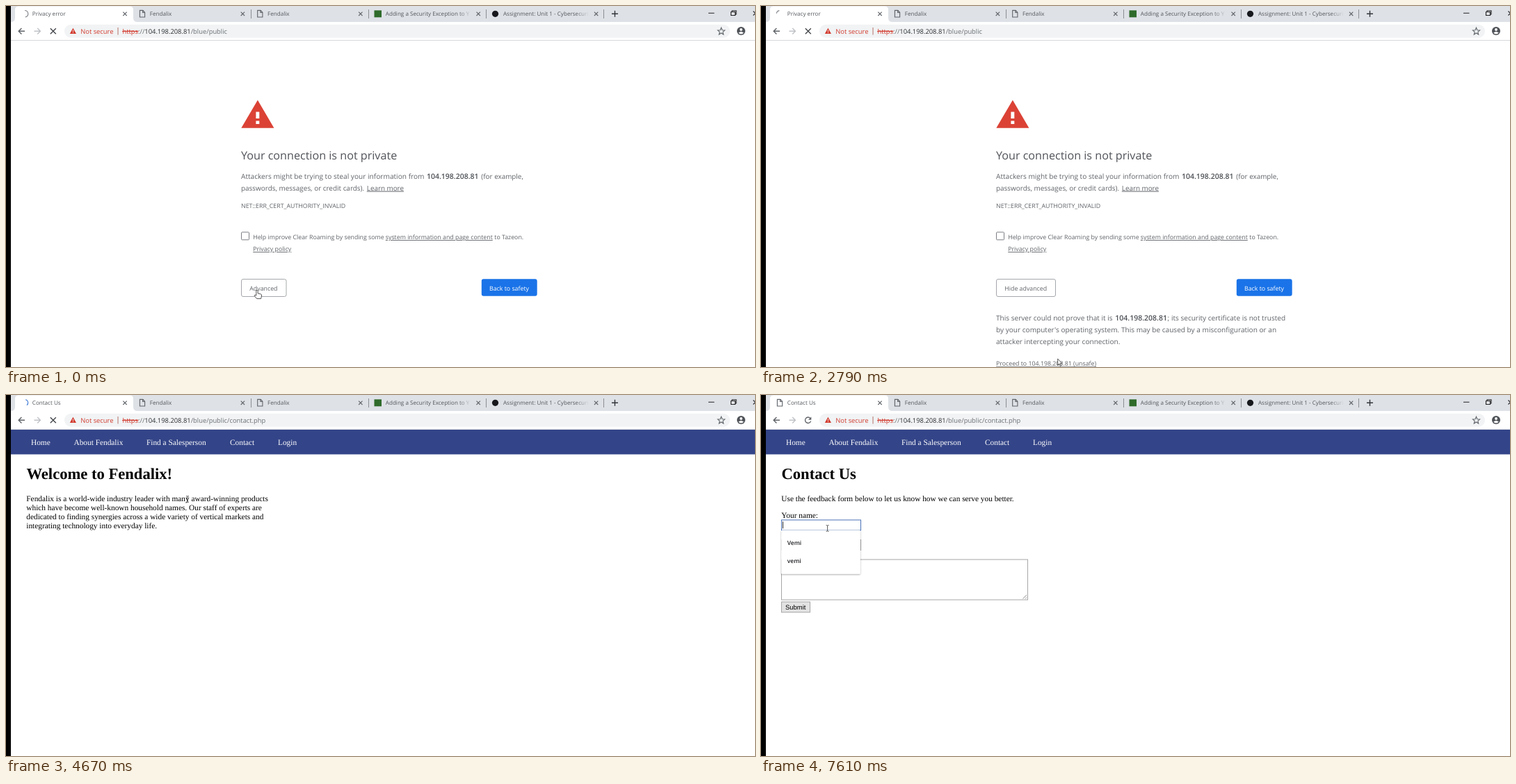
Recreate the animation shown at these times as an HTML page. Size 1077x520 px, loop 8000 ms.

```html
<!DOCTYPE html>
<html lang="en">
<head>
<meta charset="utf-8">
<title>Browser session</title>
<style>
html, body { margin: 0; width: 100%; height: 100%; overflow: hidden; background: #fff; }
svg { display: block; width: 1077px; height: 520px; }
text { font-family: "Open Sans", "Noto Sans", sans-serif; text-rendering: geometricPrecision; white-space: pre; }
.tab { font-size: 8.1px; fill: #54585d; }
.url { font-size: 9.37px; fill: #6b6f74; }
.body { font-size: 10.08px; fill: #5f6368; }
.small { font-size: 8.8px; fill: #5f6368; }
.bold { font-size: 10.5px; font-weight: 600; fill: #4c5055; }
.link { text-decoration: underline; text-underline-offset: 1.1px; }
.serif text { font-family: "Liberation Serif", "Times New Roman", serif; font-size: 11.34px; }
.serif .h1 { font-size: 22.6px; font-weight: bold; }
.nav text { fill: #fff; }
.line { fill: none; stroke: #5f6368; stroke-width: 1.1; }
.field { fill: #fff; stroke: #a6a6a6; }
.ptr path { fill: #fff; stroke: #2c2c2c; stroke-width: .8; stroke-linejoin: round; }
</style>
</head>
<body>
<svg viewBox="0 0 1077 520">
  <defs>
    <linearGradient id="fade"><stop stop-color="#dee1e6" stop-opacity="0"/><stop offset="1" stop-color="#dee1e6"/></linearGradient>
    <filter id="shadow" x="-10%" y="-10%" width="120%" height="125%"><feDropShadow dx="0" dy="1" stdDeviation="1" flood-opacity=".35"/></filter>
    <path id="doc" class="line" d="M-3.6-4.8H.9L3.6-2V4.8H-3.6ZM.6-4.6V-1.7H3.4"/>
    <path id="cross" class="line" d="M-2.7-2.7 2.7 2.7M2.7-2.7-2.7 2.7"/>
  </defs>
  <rect width="1077" height="520" fill="#fff"/>

  <!-- certificate warning -->
  <g id="warning">
    <path d="M361.9 135.4 385.4 175.7H338.3Z" fill="#db4235"/>
    <path d="M359.4 152.5H364.3V162H359.4ZM359.4 165.4H364.3V170H359.4Z" fill="#fff"/>
    <text x="338" y="221" font-size="16.15" fill="#505359">Your connection is not private</text>
    <text class="body" x="338" y="248.6" style="font-size:10.14px">Attackers might be trying to steal your information from</text>
    <text class="bold" x="605" y="248.6">104.198.208.81</text>
    <text class="body" x="683.3" y="248.6" style="font-size:9.9px">(for example,</text>
    <text class="body" x="338" y="265.6" style="font-size:9.95px">passwords, messages, or credit cards).</text>
    <text class="body link" x="518.8" y="265.6" style="font-size:9.85px">Learn more</text>
    <text class="small" x="338" y="291.2">NET::ERR_CERT_AUTHORITY_INVALID</text>
    <rect x="338.5" y="325.8" width="11" height="11" rx="1" fill="#fff" stroke="#7b7e82"/>
    <text class="small" x="355.2" y="336">Help improve Clear Roaming by sending some</text>
    <text class="small link" x="545.8" y="336">system information and page content</text>
    <text class="small" x="702.3" y="336">to Tazeon.</text>
    <text class="small link" x="355.2" y="353">Privacy policy</text>
    <rect id="advBox" x="338.5" y="393.5" width="64.5" height="25" rx="2.5" fill="#fff" stroke="#a4a7ab"/>
    <text id="advText" class="small" x="350.3" y="410">Advanced</text>
    <rect x="683.8" y="393.3" width="79.9" height="24.5" rx="2.8" fill="#1a73e8"/>
    <text class="small" x="695" y="409.8" style="fill:#fff">Back to safety</text>
    <g id="details">
      <text class="body" x="338" y="453">This server could not prove that it is</text>
      <text class="bold" x="509.3" y="453">104.198.208.81</text>
      <text class="body" x="584.6" y="453">; its security certificate is not trusted</text>
      <text class="body" x="338" y="470">by your computer's operating system. This may be caused by a misconfiguration or an</text>
      <text class="body" x="338" y="487">attacker intercepting your connection.</text>
      <text class="small link" x="338" y="518.4">Proceed to 104.198.208.81 (unsafe)</text>
    </g>
  </g>

  <!-- site -->
  <g id="site" class="serif">
    <rect x="7" y="50" width="1070" height="35.5" fill="#334488"/>
    <g class="nav">
      <text x="36" y="72.2">Home</text>
      <text x="97.5" y="72.2">About Fendalix</text>
      <text x="202" y="72.2">Find a Salesperson</text>
      <text x="322" y="72.2">Contact</text>
      <text x="391" y="72.2">Login</text>
    </g>
    <g id="welcome">
      <text class="h1" x="29.5" y="121.3">Welcome to Fendalix!</text>
      <text x="29.3" y="152.6">Fendalix is a world-wide industry leader with many award-winning products</text>
      <text x="29.3" y="165.6">which have become well-known household names. Our staff of experts are</text>
      <text x="29.3" y="178.6">dedicated to finding synergies across a wide variety of vertical markets and</text>
      <text x="29.3" y="191.6">integrating technology into everyday life.</text>
    </g>
    <g id="contact">
      <text class="h1" x="29.5" y="121.3">Contact Us</text>
      <text x="29.3" y="152.6">Use the feedback form below to let us know how we can serve you better.</text>
      <text x="29.3" y="177">Your name:</text>
      <text x="29.3" y="205.6">Your email:</text>
      <text x="29.3" y="234">Feedback:</text>
      <rect id="nameBox" class="field" x="29.5" y="180" width="114" height="15"/>
      <rect class="field" x="29.5" y="208.5" width="114" height="15"/>
      <rect class="field" x="29.5" y="237" width="354" height="58"/>
      <path d="M376.5 293.5 382 288M380 293.5 382 291.5" stroke="#777" stroke-width=".8"/>
      <rect x="29.5" y="298" width="41" height="15" fill="#e3e3e3" stroke="#a6a6a6"/>
      <text x="35" y="308.6" style="font:9.45px 'Liberation Sans',Arial,sans-serif">Submit</text>
      <path id="caret" d="M31.5 182.3V192.3" stroke="#111" stroke-width=".9"/>
      <g id="menu">
        <rect x="29.2" y="194.8" width="113.6" height="63" rx="1.5" fill="#fff" filter="url(#shadow)"/>
        <g fill="#202124">
          <text x="37.7" y="216.3" style="font:600 8.5px 'Open Sans',sans-serif">Vemi</text>
          <text x="37.7" y="241.8" style="font:600 8.5px 'Open Sans',sans-serif">vemi</text>
        </g>
      </g>
    </g>
  </g>

  <!-- browser frame -->
  <rect width="1077" height="23" fill="#dee1e6"/>
  <rect y="23" width="1077" height="26.5" fill="#fff"/>
  <path d="M7 49.5H1077" stroke="#d6d8db"/>
  <path d="M7 23Q13 23 13 17V5Q13 .5 18 .5H178Q183 .5 183 5V17Q183 23 189 23Z" fill="#fff"/>
  <path d="M352.5 5V18M521.5 5V18M690.5 5V18M859.5 5V18" stroke="#8b8f94"/>
  <g id="closers"></g>
  <use href="#doc" x="196" y="11.2"/>
  <use href="#doc" x="365.3" y="11.2"/>
  <rect x="529.5" y="6.3" width="10.5" height="10" fill="#2f6b2b"/>
  <circle cx="703.5" cy="11.3" r="4.6" fill="#16181c"/>
  <text id="title" class="tab" x="37.8" y="14"></text>
  <text class="tab" x="206.8" y="14">Fendalix</text>
  <text class="tab" x="376" y="14">Fendalix</text>
  <text class="tab" x="545.8" y="14">Adding a Security Exception to Y</text>
  <text class="tab" x="715" y="14">Assignment: Unit 1 - Cybersecuri</text>
  <rect x="650" y="3" width="20" height="16" fill="url(#fade)"/>
  <rect x="819" y="3" width="20" height="16" fill="url(#fade)"/>
  <path class="line" style="stroke:#33363a;stroke-width:1.4" d="M871 11.3H880M875.5 6.8V15.8"/>
  <path class="line" style="stroke:#222" d="M1010 10.3H1018.5M1042.5 8.5H1048.5V13.5H1042.5ZM1044 8.3V6.7H1050V12H1048.7M1074.5 7.5 1080.5 13.5M1074.5 13.5 1080.5 7.5"/>
  <path class="line" style="stroke-width:1.4" d="M27 36.2H18.4M22.4 32 18.2 36.2 22.4 40.4"/>
  <path class="line" style="stroke:#bfc2c6;stroke-width:1.4" d="M40.5 36.2H49.2M45.2 32 49.4 36.2 45.2 40.4"/>
  <path id="stop" class="line" style="stroke:#44474b;stroke-width:1.4" d="M63.8 32.2 71.8 40.2M71.8 32.2 63.8 40.2"/>
  <g id="reload">
    <path class="line" style="stroke-width:1.4" d="M70.8 33.4A4.2 4.2 0 1 0 71.7 37.6"/>
    <path d="M72.3 31.4V35.7H68Z" fill="#5f6368"/>
  </g>
  <rect x="84" y="26.8" width="957" height="19" rx="9.5" fill="#f1f3f4"/>
  <path d="M96.4 31.8 101 40H91.8Z" fill="#d23b2f"/>
  <path d="M96.4 34.7V37.3M96.4 38V39" stroke="#fff" stroke-width=".9"/>
  <text class="url" x="107.2" y="39.6" style="fill:#d23b2f">Not secure</text>
  <path d="M161 31V41.5" stroke="#b4706b"/>
  <text class="url" x="167.4" y="39.6"><tspan fill="#d23b2f">https</tspan>://<tspan fill="#2b2e32">104.198.208.81</tspan><tspan id="path"></tspan></text>
  <path d="M167 36.6H190.5" stroke="#d23b2f"/>
  <path class="line" d="M1028.5 31.2 1029.9 34.7 1033.6 35 1030.8 37.4 1031.7 41 1028.5 39 1025.3 41 1026.2 37.4 1023.4 35 1027.1 34.7Z"/>
  <circle cx="1057" cy="36" r="6" fill="#4f5358"/>
  <circle cx="1057" cy="34" r="1.9" fill="#fff"/>
  <path d="M1053.2 38.8Q1057 35.4 1060.8 38.8Q1057 42 1053.2 38.8Z" fill="#fff"/>
  <use id="page" href="#doc" x="27" y="11.2"/>
  <path id="spin" fill="none" stroke-width="1.2"/>
  <rect width="7" height="520" fill="#000"/>

  <!-- pointers -->
  <g id="cursor" class="ptr">
    <path id="arrow" d="M.2.2V9.3L2.3 7.4 3.7 10.6 5.2 9.9 3.8 6.8H6.5Z"/>
    <path id="hand" d="M-1.2 1Q0-.9 1.2 1V5L5.4 6Q6.8 6.4 6.6 8L5.6 12.6H-.4L-4 8.2Q-3.4 6.4-1.2 8Z"/>
    <path id="beam" style="fill:none" d="M-2-4.3H-.6L0-3.8.6-4.3H2M0-3.8V3.8M-2 4.3H-.6L0 3.8.6 4.3H2"/>
  </g>
</svg>
<script>
const LOOP = 8000;
const $ = id => document.getElementById(id);
const show = (id, on) => { $(id).style.display = on ? '' : 'none'; };

// time, x, y, and the pointer kind when it changes
const moves = `0 361 409 hand; 430 361 410; 670 375 420; 790 406 432 arrow; 940 380 437; 1060 340 438;
  1180 313 438; 1330 312 438; 1840 372 470; 1960 426.5 508; 3060 442 505; 3210 350 400; 3330 286 293;
  3480 305 205; 3600 351 147; 3750 374 105; 3870 383 72; 3990 352 66 hand; 4110 339 65;
  4540 300 100 arrow; 4670 261 150 beam; 4810 215 166; 4940 180 178; 5060 169.5 180.5;
  5330 165.5 175 arrow; 6480 112.5 189 beam; 6630 96 197 arrow; 7210 95.6 192 beam`
  .split(';').map(s => s.trim().split(' '));

const tick = t => Math.floor(t / 1000 * 7.9) / 7.9 * 1000;

function arc(from, to, color) {
  const at = a => {
    const r = a * Math.PI / 180;
    return `${(27 + 4.7 * Math.cos(r)).toFixed(2)} ${(11.2 + 4.7 * Math.sin(r)).toFixed(2)}`;
  };
  $('spin').setAttribute('d', `M${at(from)}A4.7 4.7 0 ${to - from > 180 ? 1 : 0} 1 ${at(to)}`);
  $('spin').setAttribute('stroke', color);
}

function drawTab(t) {
  const waiting = t < 2520 || (t >= 2640 && t < 2940) || (t >= 4540 && t < 4670);
  const loading = t >= 4670 && t < 5060;
  const busy = waiting || loading;
  show('spin', busy);
  show('page', !busy);
  show('stop', busy);
  show('reload', !busy);
  if (loading) {
    const turn = (tick(t) - tick(4670)) * .27;
    arc(turn - 75, turn + 50, '#4a80d8');
  } else if (t < 2520) {
    const turn = -tick(Math.min(t, 1960)) * 360 / 1320;
    arc(turn - 90, turn + 80, '#85898e');
  } else if (waiting) {
    arc(t >= 2790 && t < 2940 ? 185 : 225, 262, '#85898e');
  }
  $('title').textContent = t < 2940 ? 'Privacy error' : t < 4670 ? 'Fendalix' : 'Contact Us';
  $('path').textContent = '/blue/public' + (t < 2940 ? '' : t < 4670 ? '/' : '/contact.php');
}

function drawPage(t) {
  const open = t >= 430, focus = t >= 7480;
  show('warning', t < 2940);
  show('site', t >= 2940);
  show('welcome', t < 4810);
  show('contact', t >= 4810);
  show('details', open);
  $('advText').textContent = open ? 'Hide advanced' : 'Advanced';
  $('advBox').setAttribute('width', open ? 85 : 64.5);
  $('advBox').setAttribute('stroke', open && t < 2240 ? '#4f82d6' : '#a4a7ab');
  $('nameBox').style.stroke = focus ? '#4a72b5' : '';
  show('caret', focus);
  show('menu', t >= 7610);
}

function drawCursor(t) {
  let x, y, kind;
  for (const m of moves) {
    if (+m[0] > t) break;
    [, x, y] = m;
    kind = m[3] || kind;
  }
  $('cursor').setAttribute('transform', `translate(${x} ${y})`);
  for (const k of ['arrow', 'hand', 'beam']) show(k, k === kind);
}

function draw(t) {
  drawTab(t);
  drawPage(t);
  drawCursor(t);
}

$('closers').innerHTML = [0, 1, 2, 3, 4]
  .map(i => `<use href="#cross" x="${171 + i * 169.4}" y="11.3"/>`).join('');

const start = performance.now();
function loop() {
  draw((performance.now() - start) % LOOP);
  requestAnimationFrame(loop);
}
draw(0);
requestAnimationFrame(loop);
</script>
</body>
</html>
```
